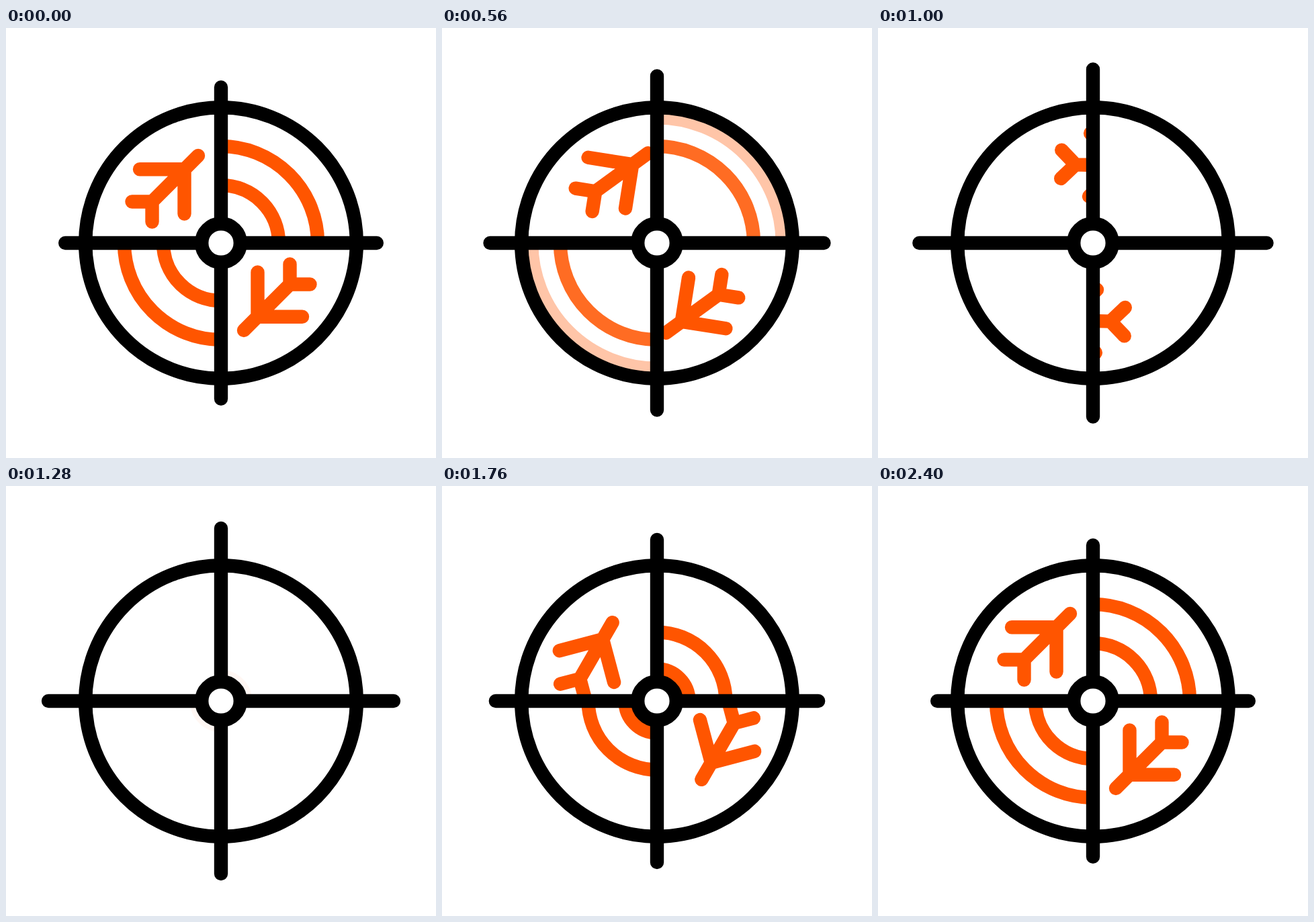
An HTML page for the animation above (2520 ms loop, 640 px wide and 640 px high).

```html
<!DOCTYPE html>
<html lang="en">
<head>
<meta charset="utf-8">
<title>Radar</title>
<style>
  html, body { margin: 0; width: 100%; height: 100%; overflow: hidden; background: #fff; }
  svg { display: block; width: 100%; height: 100%; }
</style>
</head>
<body>
<svg viewBox="-320 -320 640 640" fill="none" stroke-width="20.4" stroke-linecap="round" stroke-linejoin="round">
  <defs>
    <clipPath id="planeArea"><path d="M-320-320H0V0H-320ZM0 0H320V320H0Z"/></clipPath>
    <clipPath id="waveArea"><path d="M0-320H320V0H0ZM-320 0H0V320H-320Z"/></clipPath>
    <path id="plane" d="M-34-130L-102.5-61.5M-121-109.7H-54.5V-43.5M-132.5-61.5H-102.5V-31.5"/>
  </defs>
  <g stroke="#f50">
    <g clip-path="url(#waveArea)">
      <circle id="outer"/>
      <circle id="inner"/>
    </g>
    <g clip-path="url(#planeArea)">
      <g id="planes">
        <use href="#plane"/>
        <use href="#plane" transform="rotate(180)"/>
      </g>
    </g>
  </g>
  <g stroke="#000">
    <circle r="201.8"/>
    <path id="cross"/>
    <circle r="28.8" fill="#fff"/>
  </g>
</svg>
<script>
  const LOOP = 2520, STEP = 40, START = 40, END = 2400;
  const $ = id => document.getElementById(id);
  const mix = (a, b, k) => a + (b - a) * k;

  // Cubic easing with handles (a, 0) and (b, 1)
  function ease(x, a = 2 / 3, b = 1 / 3) {
    if (x <= 0) return 0;
    if (x >= 1) return 1;
    let lo = 0, hi = 1, s;
    for (let i = 0; i < 24; i++) {
      s = (lo + hi) / 2;
      const u = 1 - s;
      if (3 * u * u * s * a + 3 * u * s * s * b + s * s * s < x) lo = s;
      else hi = s;
    }
    return s * s * (3 - 2 * s);
  }

  const span = (t, from, to, a, b) => ease((t - from) / (to - from), a, b);

  const FADE = 440;
  const waves = [
    { el: $('outer'), rest: 144, out: [START, 920], hide: 315, core: 35, back: [1160, 2270], show: 1185 },
    { el: $('inner'), rest: 86, out: [START, 1080], hide: 415, core: 33, back: [1280, 2440], show: 1305 }
  ];

  function drawWave(w, t) {
    const leaving = t < 1100;
    let r = leaving ? mix(w.rest, 202, span(t, ...w.out)) : mix(w.core, w.rest, span(t, ...w.back));
    if (t >= END) r = w.rest;
    const alpha = leaving ? 1 - span(t, w.hide, w.hide + FADE) : span(t, w.show, w.show + FADE);
    w.el.setAttribute('r', r.toFixed(2));
    w.el.setAttribute('opacity', alpha.toFixed(3));
  }

  function draw(time) {
    const t = Math.floor((time % LOOP) / STEP) * STEP;
    waves.forEach(w => drawWave(w, t));

    const turn = 180 * span(t, START, END);
    $('planes').setAttribute('transform', `rotate(${turn.toFixed(3)})`);

    const peak = 1000;
    const grow = t < peak ? span(t, START, peak) : 1 - span(t, peak, END, 0.54, 0.35);
    const arm = mix(231.8, 258.6, grow).toFixed(2);
    $('cross').setAttribute('d', `M-${arm} 0H${arm}M0-${arm}V${arm}`);
  }

  const origin = performance.now();
  function tick() {
    draw(performance.now() - origin);
    requestAnimationFrame(tick);
  }
  tick();
</script>
</body>
</html>
```
